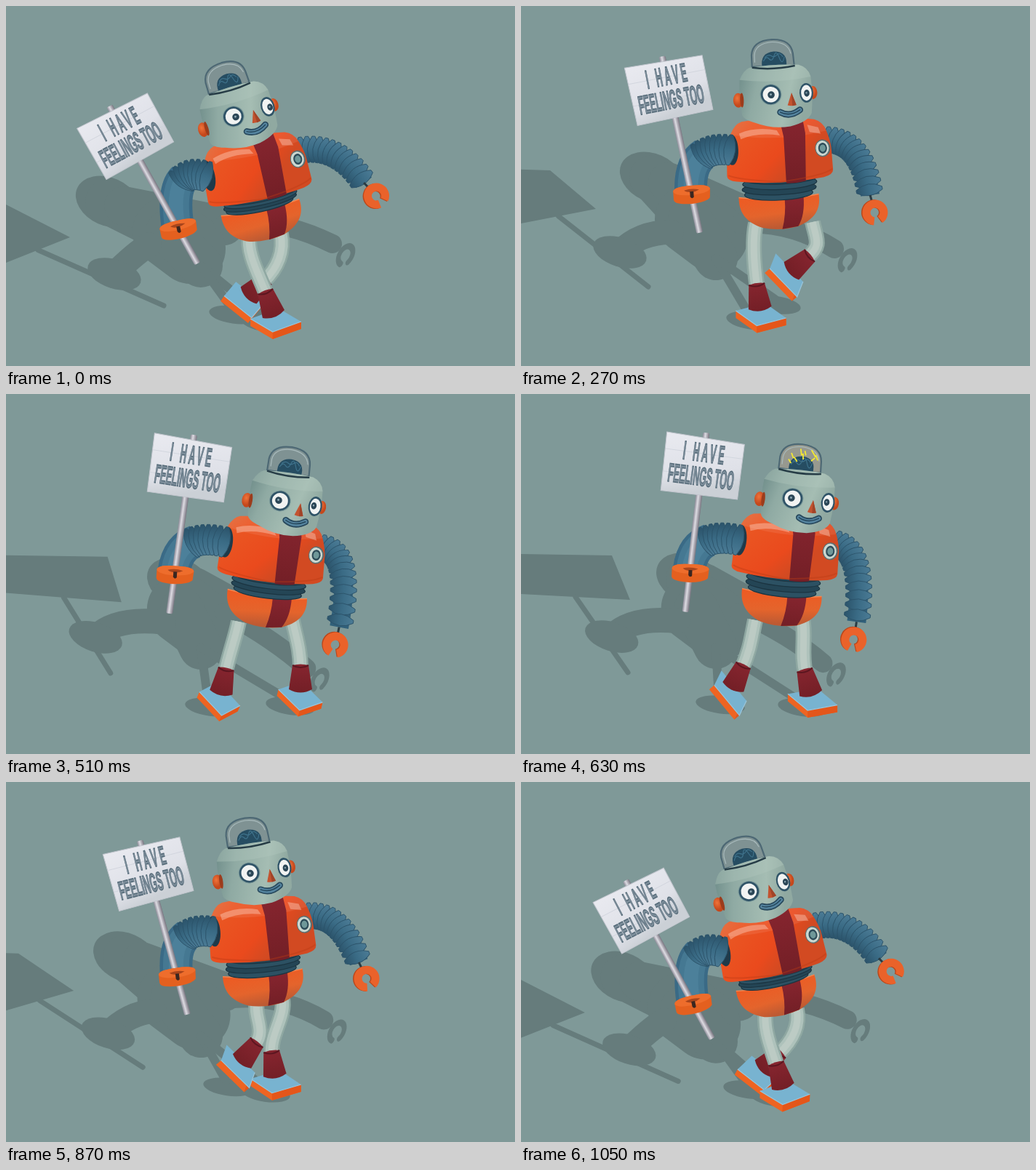
Write an HTML page that moves like this. It is 700 by 495 pixels and loops after 1.08 s.

```html
<!DOCTYPE html>
<html lang="en">
<head>
<meta charset="utf-8">
<title>Marching robot</title>
<style>
  html, body { margin: 0; width: 100%; height: 100%; overflow: hidden; background: #7f9998; }
  svg { display: block; width: 100vw; height: 100vh; }
  text { font: bold 36px "Liberation Sans", Arial, sans-serif; fill: #7d8e9b; stroke: #566b79; stroke-width: 1.6px; text-anchor: middle; }
</style>
</head>
<body>
<svg viewBox="0 0 700 495">
  <defs>
    <linearGradient id="orange" x2=".8" y2=".5"><stop offset="0" stop-color="#de6a3a"/><stop offset=".3" stop-color="#ea5522"/><stop offset=".75" stop-color="#ea4a1d"/><stop offset="1" stop-color="#d24a22"/></linearGradient>
    <linearGradient id="bowlFill" x2=".2" y2="1"><stop offset="0" stop-color="#ee5a22"/><stop offset=".6" stop-color="#e4642c"/><stop offset="1" stop-color="#bd5a33"/></linearGradient>
    <linearGradient id="red" x2="0" y2="1"><stop offset="0" stop-color="#86252f"/><stop offset="1" stop-color="#731f26"/></linearGradient>
    <linearGradient id="skin" x2="1" y2=".25"><stop offset="0" stop-color="#6d8b88"/><stop offset=".3" stop-color="#8faaa3"/><stop offset=".75" stop-color="#a5bdb3"/><stop offset="1" stop-color="#90a9a1"/></linearGradient>
    <linearGradient id="paper" x2=".3" y2="1"><stop offset="0" stop-color="#e9eaf0"/><stop offset=".7" stop-color="#dfe1e8"/><stop offset="1" stop-color="#cbd0d6"/></linearGradient>
    <linearGradient id="steel"><stop offset="0" stop-color="#8b8b97"/><stop offset=".4" stop-color="#dddbe2"/><stop offset="1" stop-color="#77747f"/></linearGradient>
    <linearGradient id="rib" x2="0" y2="1"><stop offset="0" stop-color="#4b7b95"/><stop offset=".5" stop-color="#3a6b85"/><stop offset="1" stop-color="#2b536a"/></linearGradient>
    <radialGradient id="knob" cx=".4" cy=".35"><stop offset="0" stop-color="#f0733a"/><stop offset="1" stop-color="#c5481c"/></radialGradient>
  </defs>

  <g id="shadow" fill="#667c7c" stroke-linecap="round" stroke-linejoin="round"></g>
  <g id="rightArm"></g>
  <g id="legs"></g>

  <g id="pelvis">
    <path d="M-55 0Q0 9 55 0C58 24 44 36 25 43Q0 49-24 43C-45 35-56 22-55 0Z" fill="url(#bowlFill)"/>
    <path d="M8 4L34 2Q35 28 25 43L3 46Q9 26 8 4Z" fill="url(#red)"/>
    <path d="M-55 0Q0 9 55 0" fill="none" stroke="#f5864f" stroke-width="1.5"/>
  </g>
  <g id="waist"></g>

  <g id="torso">
    <path d="M-50-43Q0-50 50-42Q62-38 66-26Q72-10 72 2L73 28Q73 35 60 38Q0 47-60 39Q-73 37-73 31L-72 0Q-71-14-66-26Q-60-40-50-43Z" fill="url(#orange)"/>
    <path d="M-66-26Q-60-40-50-43Q0-50 50-42Q62-38 66-26Q0-12-66-26Z" fill="#fff" opacity=".08"/>
    <path d="M2-46L34-44L37-24L35 42Q22 45 8 44L7-20Z" fill="url(#red)"/>
    <path d="M-54-27Q-30-36-2-29L2-22Q-30-28-52-19Z" fill="#ffe4da" opacity=".35"/>
    <path d="M40-35L55-31L58-22L43-25Z" fill="#ffe4da" opacity=".35"/>
    <path d="M-71 30Q-60 36 0 42Q60 36 72 27" fill="none" stroke="#b83a16" stroke-width="2" opacity=".4"/>
    <g transform="translate(60-2)">
      <ellipse rx="10.5" ry="12" fill="#5c6f70"/><ellipse cx="-.5" rx="9" ry="10.5" fill="#cbd8d1"/>
      <ellipse rx="6" ry="7.5" fill="#2d4b58"/><ellipse rx="4" ry="5" fill="#6f9899"/>
    </g>
    <ellipse cx="-65" cy="-5" rx="9" ry="21" fill="#1f3a4a"/>
  </g>

  <g id="head">
    <ellipse cx="33" cy="0" rx="6" ry="9" fill="url(#knob)"/>
    <g transform="translate(2 1)">
      <path id="glass" d="M-51-40V-56Q-49-76-22-76.500Q4-76 6-56L7-40Z" fill="#7f9293" stroke="#4d6874" stroke-width="2.200"/>
      <path d="M-47-46V-56Q-45-72-22-73Q0-72 3-56" fill="none" stroke="#a9bbbd" stroke-width="1.200"/>
      <path d="M-37-38Q-40-59-20-60Q0-59-4-38Z" fill="#264d62"/>
      <path d="M-35-47q4-8 8-3t7-4t7 3t7-1M-33-52q5-5 9-2t8-1t8 3" fill="none" stroke="#3f728b" stroke-width="1.200"/>
      <path id="sparks" d="M-39-54l4 5M-36-63l3 6 2 0 4 5M-24-70l2 8 2-1 1 7M-18-68l2 6M-9-70l6 8 1-1 3 6M-3-60l-5 5" fill="none" stroke="#f4ea32" stroke-width="1.800"/>
    </g>
    <path d="M-53-38Q-18-42 15-39Q28-35 31-22Q33 5 30 28Q25 40 0 45Q-25 48-48 38Q-65 33-66 25Q-69 0-67-22Q-61-35-53-38Z" fill="url(#skin)"/>
    <path d="M-67-22Q-61-35-53-38Q-18-42 15-39Q28-35 31-22Q-18-14-67-22Z" fill="#aec6bc" opacity=".4"/>
    <path d="M-49-38Q-20-33 10-38" fill="none" stroke="#263c46" stroke-width="2.500"/>
    <ellipse cx="-70" cy="6" rx="7" ry="10" fill="url(#knob)"/><ellipse cx="-65" cy="6" rx="2.500" ry="10" fill="#9c3c1c"/>
    <ellipse cx="-25" rx="15" ry="14.500" fill="#7f9d9c"/><ellipse cx="-25" rx="13.800" ry="13.500" fill="#2f5367"/><ellipse cx="-25" rx="11" ry="10.800" fill="#f1f3f2"/>
    <ellipse cx="24" rx="9.500" ry="13.500" fill="#2f5367"/><ellipse cx="24" rx="7.300" ry="10.800" fill="#f1f3f2"/>
    <g id="pupils" fill="#2b4656"><circle cx="-26" r="4.800"/><ellipse cx="23" rx="3.800" ry="4.800"/><g fill="#8ea8b3"><circle cx="-26.500" cy="-.5" r="1.500"/><circle cx="22.500" cy="-.5" r="1.200"/></g></g>
    <path d="M3.500-1L9 16Q3-2 18-2.500 16Z" fill="none"/>
    <path d="M3.500-1L9.500 16Q3 18-2.500 16Z" fill="#c3532f"/><path d="M3.500-1L9.500 16L4 17Z" fill="#a14428"/>
    <g transform="translate(-4)" fill="none" stroke-linecap="round"><path d="M-9 25Q4 33 18 23" stroke="#28495d" stroke-width="9"/><path d="M-9 25Q4 33 18 23" stroke="#5585a0" stroke-width="5.500"/><path d="M-9 25Q4 32 18 23" stroke="#25465a" stroke-width="1.500"/></g>
  </g>

  <g id="leftArm"></g>
  <g id="sign">
    <rect x="-4.500" y="-194" width="9" height="248" rx="2" fill="url(#steel)"/>
    <path d="M-54-189L54-184L53-108L-53-108Z" fill="url(#paper)" stroke="#c2c6ce"/>
    <path d="M-53-166L53-164M-53-135L53-134" stroke="#cfd3dc" stroke-width=".8"/>
    <g transform="rotate(1)scale(.34 1)"><text x="-4" y="-154" letter-spacing="10">I HAVE</text><text x="-8" y="-121">FEELINGS TOO</text></g>
  </g>
  <g id="hand">
    <path d="M-25-5Q-25-12 0-12Q25-13 26-6L25 6Q20 12 0 13Q-24 13-25 6Z" fill="#e4601f"/>
    <path d="M-25-5Q-25-12 0-12Q25-13 26-6Q22 0 0 1Q-22 1-25-5Z" fill="#ee6d2c"/>
    <path d="M-10-6Q0-9 11-6Q6-3 0-3Q-7-3-10-6Z" fill="#a8451c"/>
    <path d="M-2-4H3V4Q0 7-2 3Z" fill="#3a2620"/>
  </g>
</svg>
<script>
const LOOP = 1080, STEP = 30;
const el = id => document.getElementById(id);
const mix = (a, b, k) => a + (b - a) * k;
const mixPt = (a, b, k) => [mix(a[0], b[0], k), mix(a[1], b[1], k)];
const add = (a, b, k = 1) => [a[0] + b[0] * k, a[1] + b[1] * k];
const fmt = p => p.map(n => n.toFixed(2)).join(' ');
const rad = deg => deg * Math.PI / 180;
const spin = ([x, y], deg) => {
  const c = Math.cos(rad(deg)), s = Math.sin(rad(deg));
  return [x * c - y * s, x * s + y * c];
};
const poly = (pts, fill) => `<path d="M${pts.map(fmt).join('L')}Z" fill="${fill}"/>`;
const line = (d, color, width) => `<path d="${d}" fill="none" stroke="${color}" stroke-width="${width}"/>`;
const place = (id, p, deg) => el(id).setAttribute('transform', `translate(${fmt(p)})rotate(${deg.toFixed(2)})`);

// Sway with one cycle per loop plus bounce with two.
let theta = 0;
const wave = (base, c1, c2 = 0, s1 = 0, s2 = 0) => base + c1 * Math.cos(theta) + s1 * Math.sin(theta)
  + c2 * Math.cos(2 * theta) + s2 * Math.sin(2 * theta);

// Rows: time, foot x, foot y, lift, ankle angle, hip x.
const leftSteps = [
  [0, 371, 432, 0, -20, 335], [120, 354, 429, 0, -18, 328], [270, 330, 424, 0, -8, 323], [390, 311, 422, 0, -4, 321],
  [510, 294, 419, .5, 12, 320], [630, 288, 411, 1, 25, 322], [870, 319, 391, 1, 38, 345], [1050, 363, 427, .05, -17, 337]];
const rightSteps = [
  [0, 327, 404, .7, 47, 378], [120, 345, 388, 1, 45, 386], [270, 365, 370, 1, 50, 401], [390, 387, 392, 1, 28, 402],
  [510, 405, 415, .3, 0, 394], [630, 401, 420, 0, -15, 387], [870, 371, 412, 0, -8, 380], [1050, 326, 400, .6, 47, 379]];

// Periodic cubic interpolation through the rows.
function sample(rows, t) {
  const n = rows.length;
  const row = i => {
    const turn = Math.floor(i / n), r = rows[i - turn * n];
    return [r[0] + turn * LOOP, ...r.slice(1)];
  };
  let i = n - 1;
  while (rows[i][0] > t) i--;
  const [p, a, b, q] = [i - 1, i, i + 1, i + 2].map(row);
  const span = b[0] - a[0], k = (t - a[0]) / span;
  return a.slice(1).map((v, j) => {
    const w = b[j + 1];
    const m0 = (w - p[j + 1]) / (b[0] - p[0]) * span, m1 = (q[j + 1] - v) / (q[0] - a[0]) * span;
    return v + k * (m0 + k * (3 * (w - v) - 2 * m0 - m1 + k * (2 * (v - w) + m0 + m1)));
  });
}

// Point and heading on a quadratic curve.
function along(a, c, b, k) {
  const p = mixPt(a, c, k), q = mixPt(c, b, k);
  return { at: mixPt(p, q, k), deg: Math.atan2(q[1] - p[1], q[0] - p[0]) * 180 / Math.PI };
}

function ribs(a, c, b, from, to, count, half) {
  let out = '';
  for (let i = 0; i < count; i++) {
    const { at, deg } = along(a, c, b, mix(from, to, i / (count - 1)));
    out += `<path transform="translate(${fmt(at)})rotate(${deg.toFixed(1)})" d="M-2 ${-half}H2Q8 ${-half * .5} 8 0T2 ${half}H-2Q-8 ${half * .5}-8 0T-2 ${-half}Z" fill="url(#rib)" stroke="#2c536a" stroke-width=".9"/>`;
  }
  return out;
}

function leg([x, y, lift, angle, hipX], hipY, turn, side) {
  lift = Math.max(0, Math.min(1, lift));
  const foot = [x, y];
  const u = spin(mixPt([41, -7], [10, -20], lift), turn);
  const v = spin(mixPt([27, 23], [34, 42], lift), turn);
  const drop = mixPt([0, 10], [-7, 6], lift);
  const corner = (i, j) => add(add(foot, u, i / 2), v, j / 2);
  const tl = corner(-1, -1), bl = corner(-1, 1), br = corner(1, 1), tr = corner(1, -1);
  const [tl2, bl2, br2] = [tl, bl, br].map(p => add(p, drop));
  const up = spin([0, -1], angle);
  const ankle = add(foot, up, 38);
  const tube = `M${fmt([hipX, hipY])}C${fmt([hipX + side * 5, hipY + 24])} ${fmt(add(ankle, up, 26))} ${fmt(ankle)}`;
  const cuff = `<path transform="translate(${fmt(foot)})rotate(${angle.toFixed(1)})"`;
  return line(tube, '#8fa8a2', 22) + line(tube, '#aec2bb', 17) + line(tube, '#bccbc4', 9)
    + poly([tl, bl, br, br2, bl2, tl2], '#ee6422') + poly([bl, br, br2, bl2], '#e4561a')
    + poly([tl, bl, br, tr], '#78b3d0') + line(`M${fmt(tl)}L${fmt(bl)}L${fmt(br)}`, '#98c6dc', 1.2)
    + `${cuff} d="M-11-42Q0-45 11-42L16-9Q0 0-16-9Z" fill="url(#red)"/>`
    + `${cuff} d="M-11-42Q0-36 11-42" fill="none" stroke="#5c1620" stroke-width="2"/>`;
}

function drawShadow(left, right) {
  const dark = '#667c7c';
  const near = [wave(113.5, -36, 10.5), wave(290.7, 15.6, 11.7)];
  const far = [wave(52.9, -75.8, 12.9), wave(236, 22, 10)];
  const low = [0, wave(306, 39.8, 7.1)];
  const poleEnd = [wave(177.6, 36.8, 2.6), wave(392, 14, 6)];
  const head = [wave(184.8, -49.6, 4.8), wave(250.4, 4.2, 14.4)];
  const hand = [wave(136, 13), wave(345, 17, 6.5)];
  const claw = [wave(449, 18), wave(359.3, -25.6, 9.3)];
  const chest = [wave(232, -10), wave(298, 7, 5)], hips = [268, wave(350, 4, 3)];
  const blob = (p, rx, ry, deg) => `<ellipse rx="${rx}" ry="${ry}" transform="translate(${fmt(p)})rotate(${deg})"/>`;
  const footShade = s => blob([s[0] - 14, s[1] * .4 + 263], 34, 12, 8)
    + line(`M${fmt(hips)}L${fmt([s[0] - 16, s[1] * .4 + 255])}`, dark, 12);
  el('shadow').innerHTML = poly([[-60, far[1] - 3], far, near, low, [-60, low[1] + 20]], dark)
    + line(`M${fmt(mixPt(low, near, .5))}L${fmt(poleEnd)}`, dark, 7)
    + blob(head, 46, 33, 24) + line(`M${fmt(head)}L${fmt(chest)}`, dark, 62)
    + line(`M${fmt(add(head, [22, 6]))}L${fmt([300, chest[1] - 8])}`, dark, 54)
    + line(`M${fmt(chest)}L${fmt(add(chest, [32, 24]))}`, dark, 96) + line(`M${fmt(chest)}L${fmt(hips)}`, dark, 60)
    + line(`M${fmt(add(chest, [-25, 18]))}Q${fmt(add(hand, [28, -28]))} ${fmt(hand)}`, dark, 34) + blob(hand, 38, 20, 18)
    + line(`M300 300Q${fmt([370, claw[1] - 55])} ${fmt(add(claw, [-18, -16]))}`, dark, 26)
    + `<circle r="12" transform="translate(${fmt(claw)})rotate(120)scale(1.15 .7)" fill="none" stroke="${dark}" stroke-width="8" stroke-dasharray="62 99"/>`
    + footShade(left) + footShade(right);
}

function draw(t) {
  theta = 2 * Math.PI * t / LOOP;
  const lean = wave(-2.5, -9.5);
  const torso = [wave(355, -12), wave(210.5, 4, 10.5)];
  const pelvis = [wave(354.5, -5), wave(268.7, .6, 7.7, 0, 1)];
  const left = sample(leftSteps, t), right = sample(rightSteps, t);

  drawShadow(left, right);
  const turn = wave(-5, -5);
  el('legs').innerHTML = leg(right, pelvis[1] + 36, turn, 1) + leg(left, pelvis[1] + 38, turn, -1);
  place('pelvis', pelvis, lean);
  place('torso', torso, lean);

  const top = add(torso, spin([0, 36], lean)), bottom = add(pelvis, spin([0, -3], lean));
  el('waist').innerHTML = [3, 2, 1, 0].map(i =>
    `<ellipse transform="translate(${fmt(mixPt(top, bottom, i / 3))})rotate(${lean.toFixed(2)})" rx="${i === 3 ? 47 : 51}" ry="9" fill="${i % 2 ? '#2c5163' : '#244555'}" stroke="#1b3441" stroke-width="1.2"/>`).join('');

  place('head', [wave(369.5, -32.7, 0, -1), wave(134.6, -3.7, 14.1, 0, 2)], wave(-3.5, -12.5, 0, .8));
  el('pupils').setAttribute('transform', `translate(${wave(1.5, 2.5).toFixed(2)} ${wave(.5, 1).toFixed(2)})`);
  const lit = t >= 540 && t < 720;
  el('sparks').style.display = lit ? '' : 'none';
  el('glass').setAttribute('fill', lit ? '#97998f' : '#7f9293');

  const claw = [wave(484, 28.5, -3), wave(294, -43, 10, 0, 2)];
  const clawTurn = wave(-16, -28);
  const wrist = add(claw, spin([0, -25], clawTurn));
  const armTop = add(torso, spin([68, -13], lean)), armBend = [wave(467, -10, 0, 3), wave(195.9, -15.2, 9.35, 0, 4)];
  el('rightArm').innerHTML = line(`M${fmt(armTop)}Q${fmt(armBend)} ${fmt(wrist)}`, '#31607a', 26)
    + ribs(armTop, armBend, wrist, 0, .95, 13, 18)
    + line(`M${fmt(wrist)}L${fmt(add(claw, spin([0, -14], clawTurn)))}`, '#2a3c44', 3)
    + `<g transform="translate(${fmt(claw)})rotate(${(clawTurn + 112).toFixed(1)})" fill="none" stroke-width="11"><circle r="12" cy="1.5" stroke="#b9461a" stroke-dasharray="66 99"/><circle r="12" stroke="#ea622a" stroke-dasharray="66 99"/></g>`;

  const hand = [wave(234.5, 2.5), wave(267.3, 29.4, 10.3, 2)];
  const shoulder = add(torso, spin([-68, -5], lean)), elbow = [wave(232, -8), wave(197.3, 14.4, 6.3)], grip = add(hand, [-1, -5]);
  const forearm = `M${fmt(along(shoulder, elbow, grip, .4).at)}Q${fmt(mixPt(elbow, grip, .4))} ${fmt(grip)}`;
  el('leftArm').innerHTML = line(forearm, '#3a6a86', 45) + line(forearm, '#457892', 36) + line(forearm, '#4c809a', 20)
    + ribs(shoulder, elbow, grip, .46, 0, 8, 21);
  place('sign', hand, wave(-10.4, -18.8, 0, -1.6));
  place('hand', hand, wave(-4, -8));
}

const start = performance.now();
function tick() {
  draw(Math.floor((performance.now() - start) / STEP) * STEP % LOOP);
  requestAnimationFrame(tick);
}
tick();
</script>
</body>
</html>
```
